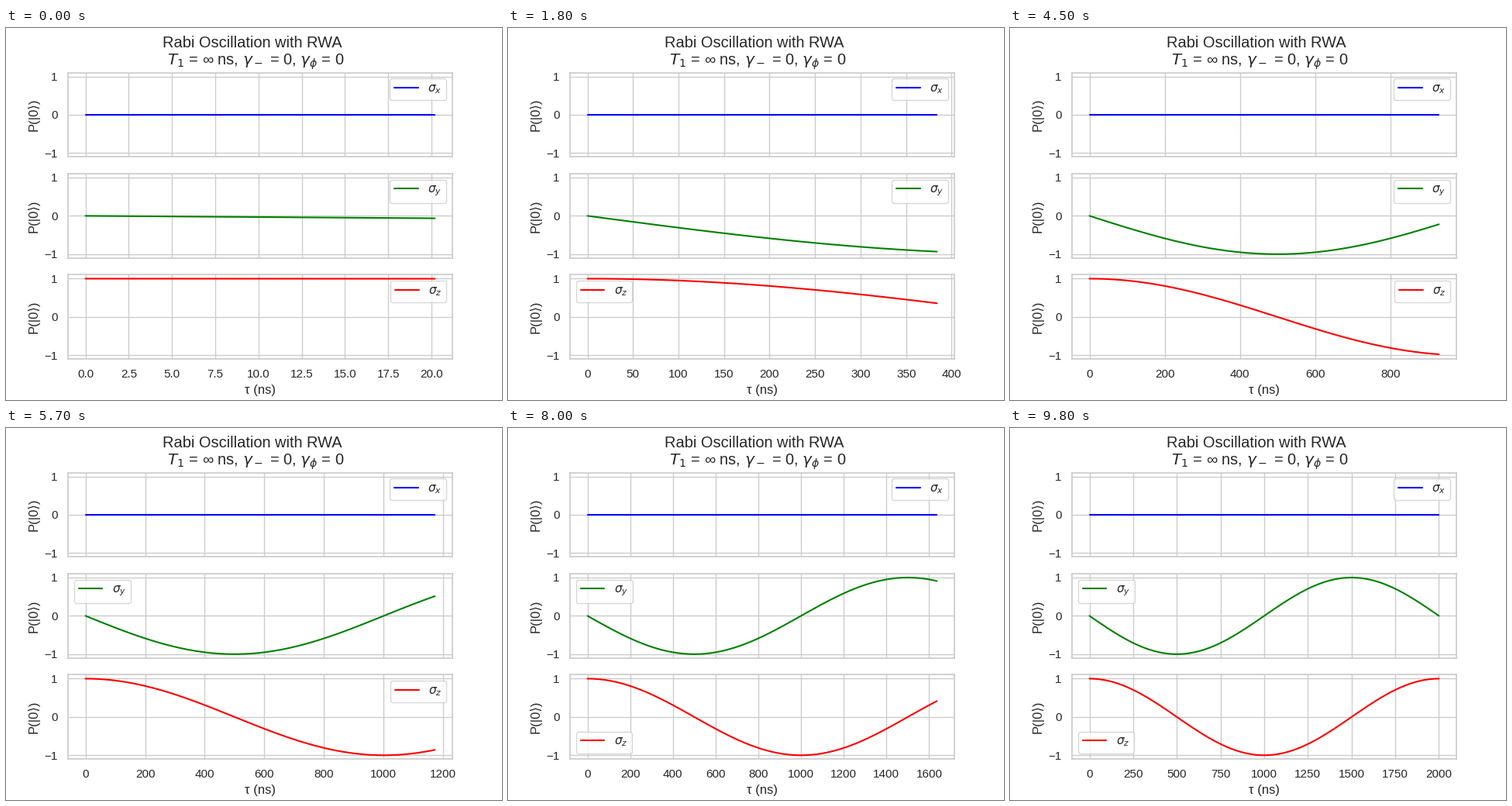
These frames come from a looping animation (640x480 px, 9.9 s). A matplotlib script:

```python
import numpy as np
import matplotlib.pyplot as plt
from matplotlib.animation import FuncAnimation

PERIOD = 2000  # ns per full Rabi cycle
STEPS = 100
DARK, LIGHT = "0.15", "0.8"

plt.rcParams.update({
    "font.family": ["Liberation Sans", "DejaVu Sans"],
    "font.size": 12,
    "figure.titlesize": "large",
    "axes.labelsize": 12,
    "xtick.labelsize": 11,
    "ytick.labelsize": 11,
    "legend.fontsize": 11,
    "text.color": DARK,
    "axes.labelcolor": DARK,
    "xtick.color": DARK,
    "ytick.color": DARK,
    "axes.edgecolor": LIGHT,
    "axes.linewidth": 1.25,
    "axes.axisbelow": True,
    "axes.grid": True,
    "grid.color": LIGHT,
    "grid.linewidth": 1,
    "lines.linewidth": 1.5,
    "lines.solid_capstyle": "round",
    "patch.linewidth": 1,
    "xtick.bottom": False,
    "ytick.left": False,
    "xtick.major.size": 6,
    "ytick.major.size": 6,
})

tau = np.linspace(0, PERIOD, STEPS)
phase = 2 * np.pi * tau / PERIOD
signals = [np.zeros(STEPS), -np.sin(phase), np.cos(phase)]

fig, axes = plt.subplots(3, 1, sharex=True, figsize=(6.4, 4.8), dpi=100)
fig.suptitle("Rabi Oscillation with RWA \n"
             r" $T_1$ = ∞ ns, $\gamma_-$ = 0, $\gamma_\phi$ = 0")

lines = []
for ax, name, color in zip(axes, "xyz", ("blue", "green", "red")):
    line, = ax.plot([], [], color=color, label=rf"$\sigma_{name}$")
    lines.append(line)
    ax.set_ylim(-1.1, 1.1)
    ax.set_ylabel("P(|0⟩)")
    ax.legend(loc="best")
axes[-1].set_xlabel("τ (ns)")


def update(frame):
    n = frame + 2
    end = tau[n - 1]
    for line, signal in zip(lines, signals):
        line.set_data(tau[:n], signal[:n])
    axes[0].set_xlim(-0.05 * end, 1.05 * end)
    return lines


anim = FuncAnimation(fig, update, frames=STEPS - 1, interval=100,
                     repeat=True, repeat_delay=0, blit=False)
plt.show()
```
